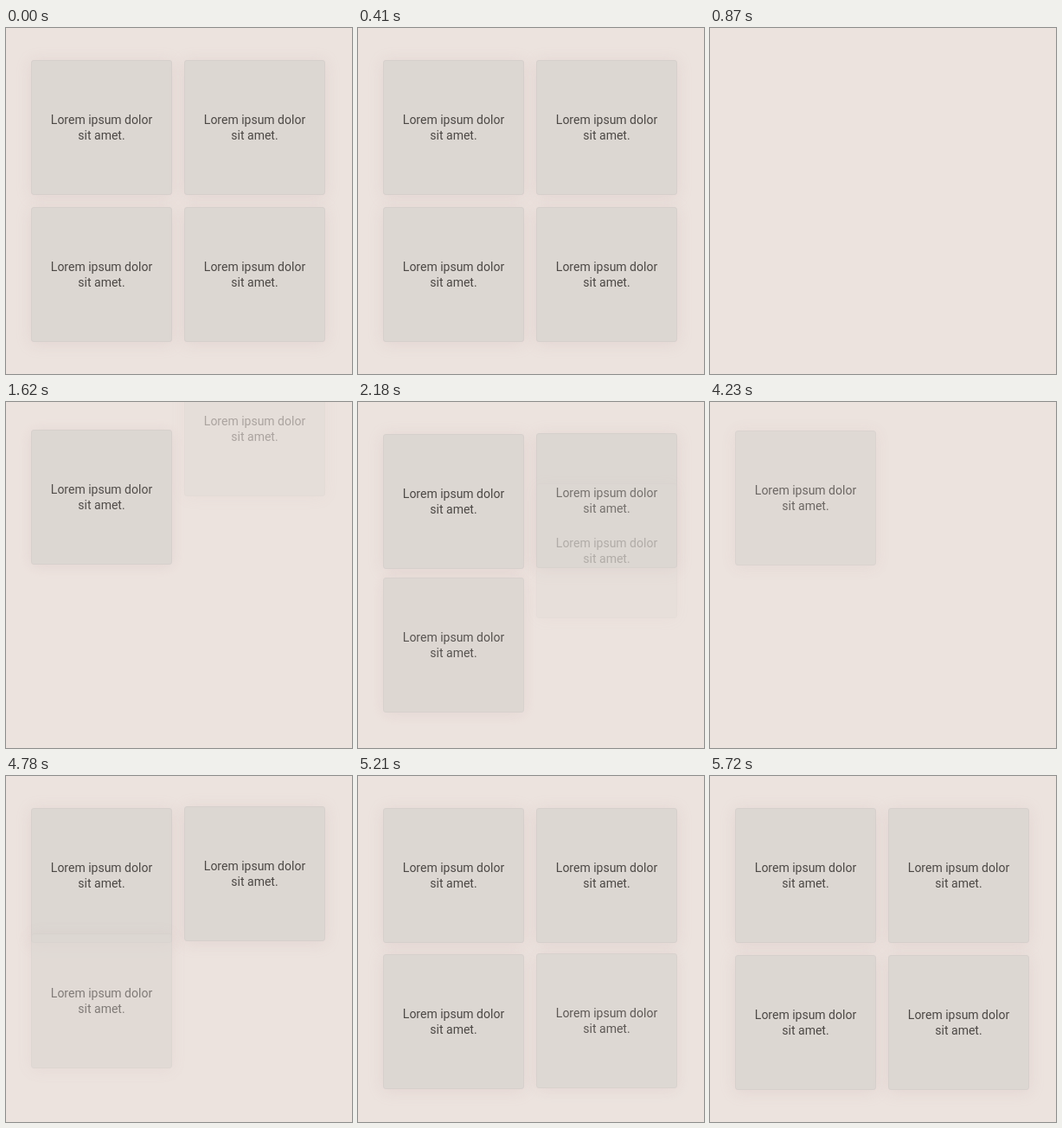
Recreate the animation shown at these times as an HTML page. Size 400 by 400 pixels, loop 5790 ms.

```html
<!DOCTYPE html>
<html lang="en">
<head>
<meta charset="utf-8">
<title>Dropping cards</title>
<style>
  html, body { margin: 0; width: 100%; height: 100%; overflow: hidden; background: #ece3de; }
  .card {
    position: absolute;
    box-sizing: border-box;
    width: 163px;
    height: 156px;
    padding: 59px 0 0;
    border: 1px solid #d6d0cc;
    border-radius: 3px;
    background: #dcd7d2;
    box-shadow: 0 2px 18px rgba(190, 155, 160, .2);
    color: #4c4845;
    font: 14px/18px Roboto, sans-serif;
    text-align: center;
  }
</style>
</head>
<body>
<script>
  const LOOP = 5790, STAGGER = 300;
  // Each play hides every card, then drops them in one after another.
  const plays = [{ hide: 870, start: 1170 }, { hide: 3530, start: 3930 }];

  const cards = [0, 1, 2, 3].map(i => {
    const card = document.createElement('div');
    card.className = 'card';
    card.style.left = (i % 2 ? 206 : 29) + 'px';
    card.style.top = (i > 1 ? 207 : 37) + 'px';
    card.innerHTML = 'Lorem ipsum dolor<br>sit amet.';
    document.body.append(card);
    return card;
  });

  const hop = (t, from, to, height) =>
    height * Math.sin(Math.PI * (t - from) / (to - from)) ** 2;

  // Height above the resting place: a fall, then two small bounces.
  function lift(t) {
    if (t < 320) return 200 * (1 - Math.max(t, 0) / 320) ** 1.35;
    if (t < 620) return hop(t, 320, 620, 5.5);
    if (t < 780) return hop(t, 620, 780, 1.2);
    return 0;
  }

  const fade = t => Math.max(0, Math.min(1, t / 375, 0.467 + t / 900));

  const origin = performance.now();

  function draw() {
    const time = (performance.now() - origin) % LOOP;
    const play = plays.filter(p => time >= p.hide).pop();
    cards.forEach((card, i) => {
      const t = play ? time - play.start - i * STAGGER : Infinity;
      card.style.opacity = fade(t);
      card.style.transform = `translateY(${-Math.round(lift(t))}px)`;
    });
    requestAnimationFrame(draw);
  }
  draw();
</script>
</body>
</html>
```
